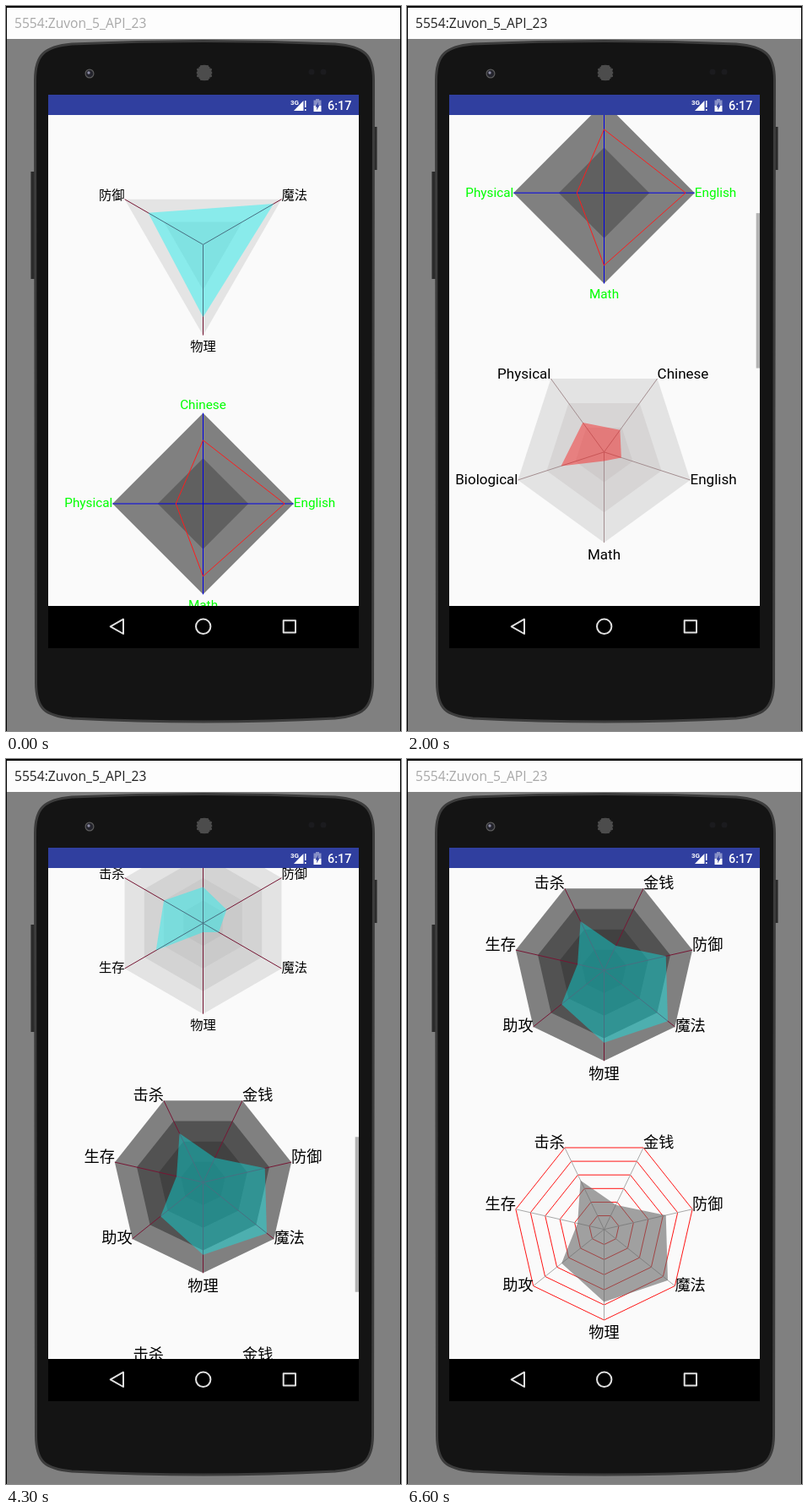
Animation, 468 px wide and 858 px high, one loop 6700 ms. Source, as an HTML page with a canvas:

```html
<!DOCTYPE html>
<html>
<head>
<meta charset="utf-8">
<style>
html, body { margin: 0; width: 100%; height: 100%; overflow: hidden; background: #808080; }
canvas { display: block; }
</style>
</head>
<body>
<canvas id="stage" width="468" height="858"></canvas>
<script>
const ctx = document.getElementById('stage').getContext('2d');
const LOOP = 6700, CX = 233.5, RADIUS = 107.3, GAP = 306.67;
const VIEW = { x: 50, y: 129, w: 368, h: 581 }, CONTENT = 6 * GAP;
const CYAN = 'rgba(0,245,245,.4)', MAROON = '#761634';
const STATS = ['物理', '魔法', '防御', '金钱', '击杀', '生存', '助攻'];
const SCORES = [.8, .9, .7, .3, .6, .3, .6];
const RISING = [.1, .2, .3, .4, .5, .6];

// Vertices run counter-clockwise from the bottom.
const charts = [
  { labels: STATS.slice(0, 3), data: SCORES, layers: ['#e4e4e4', '#d5d5d5'], spoke: MAROON, fill: CYAN, size: 15.3 },
  { labels: ['Math', 'English', 'Chinese', 'Physical'], data: SCORES, layers: ['#808080', '#606060'],
    spoke: '#0000e6', outline: '#ff1c1c', size: 15.3, ink: '#00ff00' },
  { labels: ['Math', 'English', 'Chinese', 'Physical', 'Biological'], data: RISING,
    layers: ['#e3e3e3', '#d7d5d5', '#cfcbcb'], spoke: '#a48e90', fill: 'rgba(255,0,0,.4)', size: 17 },
  { labels: STATS.slice(0, 6), data: RISING, layers: ['#e3e3e3', '#d3d3d3', '#cacaca', '#c2c2c2'],
    spoke: MAROON, fill: CYAN, size: 15.3 },
  { labels: STATS, data: SCORES, layers: ['#808080', '#525252', '#414141', '#3a3a3a'],
    spoke: MAROON, fill: CYAN, size: 18.2 },
  { labels: STATS, data: SCORES, rings: 6, spoke: '#a8a8a8', fill: 'rgba(100,100,100,.6)', size: 18.2 }
];

// Swipes: first step and number of steps (100 ms each), then the offset reached.
const swipes = [[6, 7, 190], [13, 1, 191], [16, 6, 382], [23, 6, 560], [30, 7, 748],
  [37, 7, 1008], [44, 4, 1127.5], [49, 6, CONTENT - VIEW.h]];

function scrollAt(step) {
  let y = 0;
  for (const [start, count, end] of swipes) {
    const p = Math.min(1, Math.max(0, (step - start + 1) / count));
    y += (end - y) * p * p * (3 - 2 * p);
    if (p < 1) break;
  }
  return y;
}

function rect(x, y, w, h, color) {
  ctx.fillStyle = color;
  ctx.fillRect(x, y, w, h);
}

function disc(x, y, r, color) {
  ctx.fillStyle = color;
  ctx.beginPath();
  ctx.arc(x, y, r, 0, 7);
  ctx.fill();
}

function stroke(color, width = 1) {
  ctx.strokeStyle = color;
  ctx.lineWidth = width;
  ctx.stroke();
}

function trace(points) {
  ctx.beginPath();
  for (const [x, y] of points) ctx.lineTo(x, y);
}

function poly(points) {
  trace(points);
  ctx.closePath();
}

function fillPoly(points, color) {
  poly(points);
  ctx.fillStyle = color;
  ctx.fill();
}

function write(text, x, y, font, color, align = 'left') {
  ctx.font = font;
  ctx.fillStyle = color;
  ctx.textAlign = align;
  ctx.fillText(text, x, y);
}

function drawChart(chart, cy) {
  const { labels, data, layers, rings, size } = chart, n = labels.length;
  const point = (i, k) => {
    const a = 2 * Math.PI * i / n;
    return [CX + RADIUS * k * Math.sin(a), cy + RADIUS * k * Math.cos(a)];
  };
  const ring = k => labels.map((_, i) => point(i, k));

  if (layers) layers.forEach((color, i) => fillPoly(ring(1 - i / layers.length), color));
  for (let i = rings; i > 0; i--) {
    poly(ring(i / rings));
    stroke('#ff1414');
  }
  labels.forEach((_, i) => {
    trace([[CX, cy], point(i, 1)]);
    stroke(chart.spoke);
  });
  const area = labels.map((_, i) => point(i, data[i]));
  if (chart.fill) fillPoly(area, chart.fill);
  if (chart.outline) {
    poly(area);
    stroke(chart.outline);
  }

  labels.forEach((text, i) => {
    const [x, y] = point(i, 1), dx = x - CX, lower = y > cy - .01;
    const middle = Math.abs(dx) < .01;
    const shift = middle ? (lower ? 1.17 : -.29) : (lower ? .29 : 0);
    write(text, x, y + shift * size, size + 'px Roboto, "Noto Sans CJK SC", "Noto Sans CJK", sans-serif',
      chart.ink || '#000', middle ? 'center' : dx > 0 ? 'left' : 'right');
  });
}

function drawPhone() {
  rect(29, 196, 6, 127, '#2b2b2b');
  rect(29, 196, 1, 127, '#505050');
  rect(435, 143, 5, 51, '#2b2b2b');
  rect(439, 143, 1, 51, '#505050');

  ctx.beginPath();
  ctx.moveTo(34.5, 88);
  ctx.bezierCurveTo(34.5, 58, 45, 48, 78, 45);
  ctx.quadraticCurveTo(234, 38, 390, 45);
  ctx.bezierCurveTo(425, 48, 435.5, 58, 435.5, 88);
  ctx.lineTo(434.5, 800);
  ctx.bezierCurveTo(434.5, 832, 422, 840, 390, 843);
  ctx.quadraticCurveTo(234, 851, 78, 843);
  ctx.bezierCurveTo(46, 840, 35.5, 832, 35.5, 800);
  ctx.closePath();
  ctx.fillStyle = '#141414';
  ctx.fill();
  stroke('#3c3c3c', 3);

  disc(99, 80, 5.5, '#5c5c5c');
  disc(99, 80, 4.3, '#24242c');
  disc(98, 79, 1.7, '#8c8ca4');
  disc(362, 78, 3.5, '#1b1b1e');
  disc(376, 78, 3.5, '#1b1b1e');
  disc(235, 79, 9.5, '#303030');
  for (let y = -8; y <= 8; y += 2)
    for (let x = -8 + y / 2 % 2; x <= 8; x += 2)
      if (Math.hypot(x, y) < 9) disc(235 + x, 79 + y, .7, '#808080');
}

function drawStatusBar() {
  rect(50, 105, 368, 24, '#303f9f');
  write('3G', 337, 117, '700 8px Roboto, sans-serif', '#fff');
  fillPoly([[341, 124], [352.5, 124], [352.5, 112]], '#fff');
  rect(354, 112, 1.5, 8, '#fff');
  rect(354, 122, 1.5, 2, '#fff');
  rect(364.5, 111.5, 9, 6.5, '#8790c7');
  rect(367, 110, 4, 2, '#8790c7');
  rect(364.5, 118, 9, 7, '#fff');
  fillPoly([[370, 113.5], [366.5, 119.5], [368.5, 119.5], [368, 123.5], [371.5, 117.5], [369.5, 117.5]], '#303f9f');
  write('6:17', 381, 123, '500 14.4px Roboto, sans-serif', '#fff');
}

function drawNavBar() {
  rect(50, 710, 368, 50, '#000');
  ctx.lineJoin = 'round';
  poly([[123.7, 734.3], [139, 725.7], [139, 743]]);
  stroke('#e0e0e0', 2);
  ctx.beginPath();
  ctx.arc(233.7, 734.3, 8.7, 0, 7);
  stroke('#e0e0e0', 2);
  ctx.strokeRect(328.7, 727.3, 14.3, 14.3);
  ctx.lineJoin = 'miter';
}

function drawPage(step) {
  const scroll = scrollAt(step);
  ctx.save();
  ctx.beginPath();
  ctx.rect(VIEW.x, VIEW.y, VIEW.w, VIEW.h);
  ctx.clip();
  rect(VIEW.x, VIEW.y, VIEW.w, VIEW.h, '#fafafa');
  charts.forEach((chart, i) => {
    const cy = VIEW.y + GAP * (i + .5) - scroll;
    if (cy > -20 && cy < 860) drawChart(chart, cy);
  });
  const alpha = step < 6 ? 0 : Math.min(1, Math.max(0, (58 - step) / 3));
  const ratio = VIEW.h / CONTENT;
  ctx.globalAlpha = alpha;
  rect(413.7, VIEW.y + scroll * ratio, 4.3, VIEW.h * ratio, '#b2b2b2');
  ctx.restore();
}

function draw(now) {
  const step = Math.floor(now % LOOP / 100);
  const active = step >= 6 && step < 66;
  rect(0, 0, 468, 858, '#808080');
  rect(0, 0, 468, 39, '#fdfdfd');
  write('5554:Zuvon_5_API_23', 10, 26, '15.6px "Open Sans", sans-serif', active ? '#222' : '#a8a8a8');
  drawPhone();
  drawPage(step);
  drawStatusBar();
  drawNavBar();
  rect(0, 0, 468, 2, '#000');
  rect(0, 0, 1, 858, '#000');
  rect(467, 0, 1, 858, '#000');
  requestAnimationFrame(draw);
}
requestAnimationFrame(draw);
</script>
</body>
</html>
```
